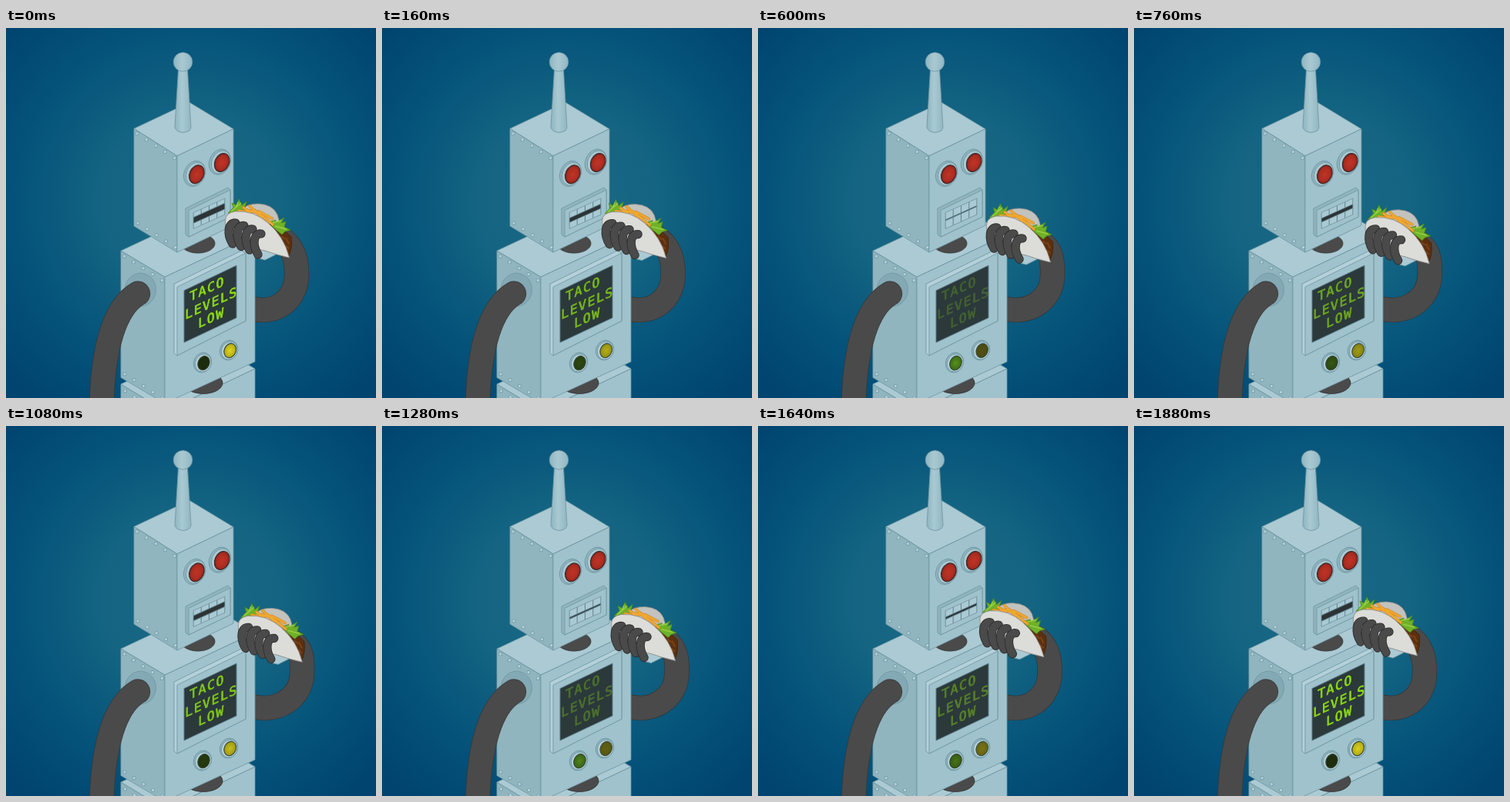
An HTML page that plays this animation: 480 px wide and 480 px high, repeating every 1.92 s.

```html
<!DOCTYPE html>
<html lang="en">
<head>
<meta charset="utf-8">
<title>Hungry robot</title>
<style>
  html, body { margin: 0; width: 100%; height: 100%; overflow: hidden; background: #004a75; }
  svg { display: block; width: 100%; height: 100%; }
  :root { --bite: 0; --chew: 1; }

  .face { stroke: #6c95a2; stroke-width: .8; stroke-linejoin: round; }
  .top { fill: #abcad3; }
  .left { fill: #90b5bf; }
  .right { fill: #9fc2cc; }
  .edge { fill: #b4d0d8; }
  .dark { fill: #4a4a4a; stroke: #333; stroke-width: .8; }
  .limb { fill: none; stroke: #4a4a4a; stroke-width: 31; stroke-linecap: round; }
  .limb.rim { stroke: #353535; stroke-width: 32.4; }
  .rivet { fill: none; stroke: #6f98a5; stroke-width: 5; stroke-linecap: round; stroke-dasharray: 0 14.5; }
  .rivet.cap { stroke: #b3d0d8; stroke-width: 3.6; }
  .tooth { fill: #a9c9d3; stroke: #587b87; stroke-width: .9; }
  .finger { fill: none; stroke: #4a4a4a; stroke-width: 9.6; stroke-linecap: round; }
  .finger.rim { stroke: #2c2c2c; stroke-width: 11.2; }
  .leaf { fill: #6fb128; stroke: #4c8a1c; stroke-width: .8; stroke-linejoin: round; }
  .vein { fill: none; stroke: #9bd245; stroke-width: 1.3; }
  .cheese { fill: none; stroke: #c97f1c; stroke-width: 3.6; stroke-linecap: round; }
  .cheese.lit { stroke: #f0a830; stroke-width: 2.6; }

  #taco { transform: translate(calc(var(--bite) * 17.5px), calc(var(--bite) * 8.7px)); }
  #upper { transform: translateY(calc(var(--chew) * -3.8px)); }
  #lower { transform: translateY(calc(var(--chew) * 3.8px)); }
  #words { opacity: calc(.12 + .88 * var(--chew)); }
  #amber { opacity: var(--chew); }
  #green { opacity: calc(1 - var(--chew)); }
  text {
    font: 16.5px "DejaVu Sans Mono", monospace; letter-spacing: 1.5px; text-anchor: middle;
    fill: #8edb14; stroke: #8edb14; stroke-width: .7; stroke-linejoin: round;
  }
</style>
</head>
<body>
<svg viewBox="0 0 480 480" preserveAspectRatio="none">
  <defs>
    <radialGradient id="sky" gradientUnits="userSpaceOnUse" cx="240" cy="225" r="330">
      <stop offset="0" stop-color="#1b6a84"/>
      <stop offset=".35" stop-color="#146482"/>
      <stop offset=".7" stop-color="#04527a"/>
      <stop offset="1" stop-color="#00446f"/>
    </radialGradient>
    <linearGradient id="tube">
      <stop offset="0" stop-color="#8fb5c0"/>
      <stop offset=".45" stop-color="#a9c9d2"/>
      <stop offset="1" stop-color="#91b7c2"/>
    </linearGradient>
    <radialGradient id="lens">
      <stop offset="0" stop-color="#bd3526"/>
      <stop offset=".7" stop-color="#ae2c20"/>
      <stop offset="1" stop-color="#8e241c"/>
    </radialGradient>
    <radialGradient id="amberGlow">
      <stop offset="0" stop-color="#ddd51c"/>
      <stop offset="1" stop-color="#b3aa12"/>
    </radialGradient>
    <radialGradient id="greenGlow">
      <stop offset="0" stop-color="#62a321"/>
      <stop offset="1" stop-color="#427616"/>
    </radialGradient>
    <clipPath id="recess"><rect width="41" height="21" y="-10"/></clipPath>
    <g id="socket" transform="rotate(24)">
      <ellipse class="face left" rx="13.4" ry="17.2"/>
      <ellipse class="face top" cx="1.6" cy="-.3" rx="12" ry="15.4"/>
      <ellipse cx="3" cy="-.4" rx="9.2" ry="12.4" fill="url(#lens)" stroke="#3c2b2c" stroke-width="1.3"/>
    </g>
    <g id="knob" transform="rotate(24)">
      <ellipse class="face left" rx="11.4" ry="13.2"/>
      <ellipse class="face edge" cx="1" cy=".2" rx="10.2" ry="11.8"/>
    </g>
    <ellipse id="lamp" rx="7.400" ry="9.400" transform="rotate(24)"/>
    <path id="teeth" class="tooth" d="M0 0h41v11H0zM10.2 0v11M20.5 0v11M30.8 0v11"/>
    <path id="studs" d="M170 137L220 169.500M171 253L221 285.500M153.500 296L204 328.500M154 449L205 481.500M154.500 471L180 487.500"/>
    <path id="leftArm" d="M171 344.500C142 362 125 412 124 495"/>
    <path id="shreds" d="M308 233L318 240M312 236L329 240M316 231L331 245M322 236L340 250M328 238L345 247M333 244L346 255M302 237L314 239"/>
  </defs>

  <rect width="480" height="480" fill="url(#sky)"/>

  <path class="limb rim arm"/>
  <path class="limb arm"/>

  <!-- hips -->
  <path class="face left" d="M149 462L207 497V540H149z"/>
  <path class="face right" d="M207 497L323 442V540H207z"/>
  <path class="face top" d="M149 462L265 408L323 442L207 497z"/>
  <ellipse class="dark" cx="256" cy="460.500" rx="25" ry="14"/>

  <!-- torso -->
  <path class="face top" d="M149 289L266 234L323 268L206 323z"/>
  <path class="face left" d="M149 289L206 323V487L149 453.500z"/>
  <path class="face right" d="M206 323L323 268V433L206 487z"/>
  <ellipse class="dark" cx="249" cy="279.500" rx="22" ry="12.500"/>

  <!-- head -->
  <path class="face top" d="M166 130.500L238 96.500L295 131L222 166z"/>
  <path class="face left" d="M166 130.500L222 166V291L166 257z"/>
  <path class="face right" d="M222 166L295 131V256L222 291z"/>
  <use href="#studs" class="rivet"/>
  <use href="#studs" class="rivet cap"/>

  <g class="face" fill="url(#tube)">
    <path d="M223.500 54L219 129Q221 135 230 135.500Q239 135 240 129L235.500 54z"/>
    <circle cx="229.500" cy="44" r="12.300"/>
  </g>

  <use href="#socket" x="244.500" y="189"/>
  <use href="#socket" x="277.300" y="173.700"/>

  <!-- mouth -->
  <path class="face left" d="M233 234L288 207L291 210V245L237 271L233 268z"/>
  <path class="face right" d="M237 236.500L291 210V245L237 271z"/>
  <g transform="matrix(1 -.45 0 1 243 249.500)">
    <g clip-path="url(#recess)">
      <rect width="41" height="21" y="-10" fill="#2d3334"/>
      <use id="upper" href="#teeth" y="-11"/>
      <use id="lower" href="#teeth"/>
    </g>
    <rect width="41" height="21" y="-10" fill="none" stroke="#7a9faa" stroke-width=".8"/>
  </g>

  <!-- screen -->
  <path class="face edge" d="M218 332L305 289L311 292V380L222 425L218 422z"/>
  <path class="face right" d="M222 336L311 292V380L222 425z"/>
  <path d="M231 340.500L299 308V376L231 408z" fill="#2b393b" stroke="#5d7f8a"/>
  <g id="words">
    <text transform="matrix(1 -.46 0 1 261 338)" y="6">TACO</text>
    <text transform="matrix(1 -.46 0 1 266.500 356.500)" y="6">LEVELS</text>
    <text transform="matrix(1 -.46 0 1 266.500 375.500)" y="6">LOW</text>
  </g>

  <!-- lamps -->
  <use href="#knob" x="255" y="434"/>
  <use href="#knob" x="289" y="418"/>
  <g stroke="#3a4b3a">
    <use href="#lamp" x="256.500" y="434.700" fill="#1d2b0d"/>
    <use href="#lamp" id="green" x="256.500" y="434.700" fill="url(#greenGlow)"/>
    <use href="#lamp" x="290.700" y="418.500" fill="#393a12"/>
    <use href="#lamp" id="amber" x="290.700" y="418.500" fill="url(#amberGlow)"/>
  </g>

  <!-- left arm -->
  <ellipse cx="174.500" cy="339.500" rx="20" ry="21.500" fill="#83a9b4" stroke="#6c95a2" stroke-width=".8"/>
  <use href="#leftArm" class="limb rim"/>
  <use href="#leftArm" class="limb"/>

  <g id="taco">
    <path class="face top" d="M326 286L352 284L350 294L336 301L328 299z"/>
    <path d="M302 238Q313 227 328 228Q346 229 352 242L358 262z" fill="#c2c2be" stroke="#858580" stroke-width=".8"/>
    <path d="M340 254Q358 258 370 271Q372 287 366 297Q360 276 340 254z" fill="#5c300f" stroke="#3f210b" stroke-width=".8"/>
    <path d="M357 270l5 4M363 272l4 8M362 282l5 4" stroke="#7a4318" stroke-width="2"/>
    <path class="leaf" d="M288 240L295 233L293 227L299 230L302 222L306 230L312 225L309 235L300 241zM341 252L350 249L349 253L361 246L357 253L363 251L361 258L369 262L362 264L358 268L347 259z"/>
    <path class="vein" d="M292 238L305 227M298 233L301 226M345 253L357 250M349 257L364 261"/>
    <use href="#shreds" class="cheese"/>
    <use href="#shreds" class="cheese lit"/>
    <path d="M284.500 249Q285 240 297 238Q321 236 340 253Q361 271 367.500 298Q350 294 336 289L296 280Q283 266 284.500 249z" fill="#dcdcd9" stroke="#858580" stroke-width=".8"/>
    <g id="hand"></g>
  </g>
</svg>
<script>
  const LOOP = 1920, TICK = 40;
  const root = document.documentElement.style;
  const arms = document.querySelectorAll('.arm');
  const wave = turn => (1 + Math.cos(turn * 2 * Math.PI)) / 2;

  const knuckles = [[298, 253], [309, 256.5], [320, 261], [331, 267]];
  document.getElementById('hand').innerHTML = knuckles.map(([x, y]) => {
    const d = `M${x} ${y}c-10-1-12 14-4 27`;
    return `<path class="finger rim" d="${d}"/><path class="finger" d="${d}"/>`;
  }).join('');

  // The elbow swings less far than the wrist.
  function armPath(bite) {
    const sway = 7.3 * bite, x = 17.5 * bite, y = 8.7 * bite;
    return `M316 363C${350 + sway / 3} 374 ${376 + sway} 352 ${377 + sway} 322` +
      `C${378 + sway} 300 ${371 + x * .7} ${281 + y} ${355 + x} ${272 + y}`;
  }

  function draw(now) {
    const turn = Math.floor(now % LOOP / TICK) * TICK / LOOP;
    const bite = 1 - wave(turn);
    root.setProperty('--bite', bite.toFixed(4));
    root.setProperty('--chew', wave(turn * 2).toFixed(4));
    arms.forEach(arm => arm.setAttribute('d', armPath(bite)));
    requestAnimationFrame(draw);
  }
  draw(performance.now());
</script>
</body>
</html>
```
